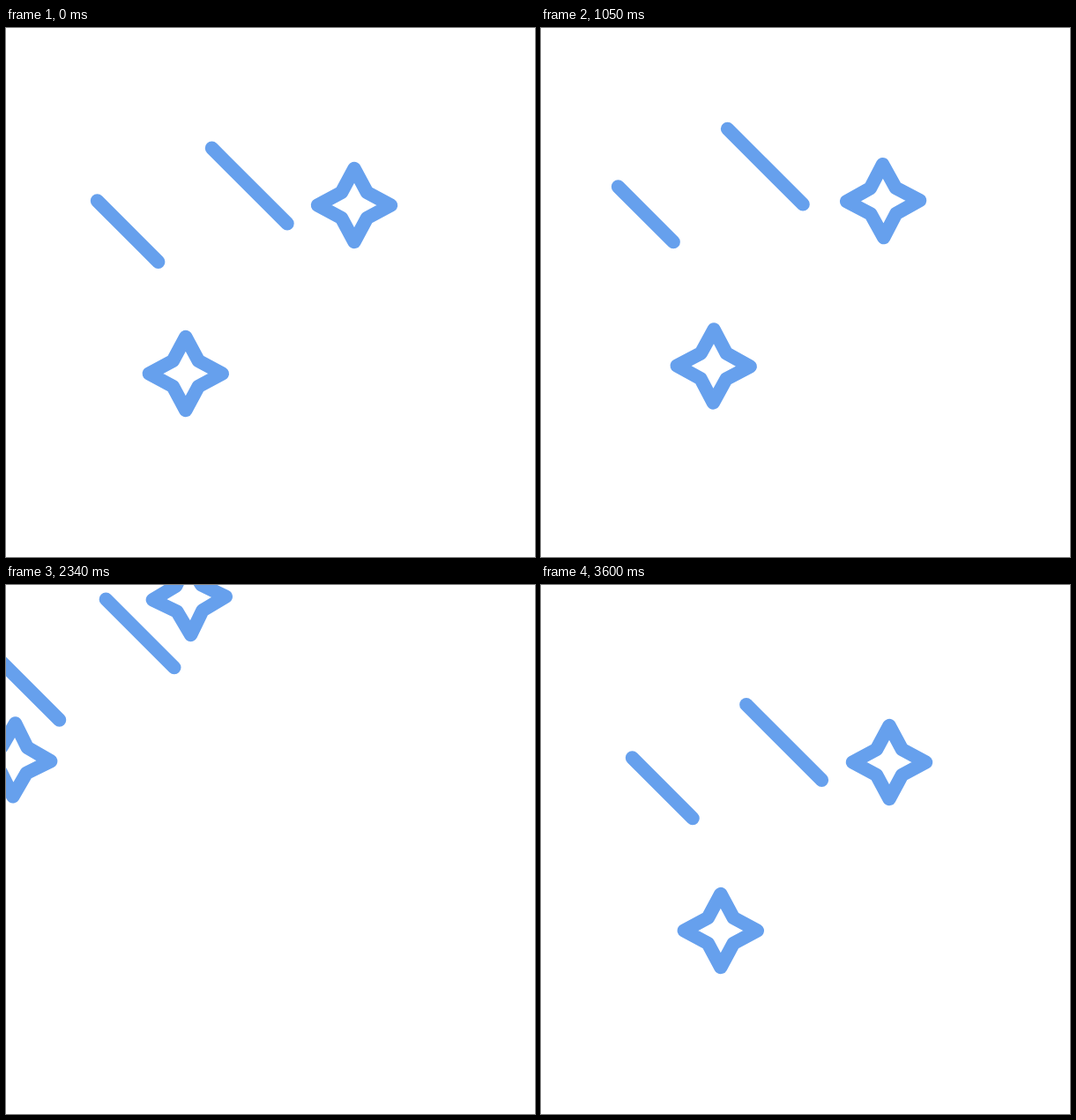
An HTML page without scripts that plays this animation: 600x600 px, repeating every 3630 ms.

```html
<!DOCTYPE html>
<html lang="en">
<head>
<meta charset="utf-8">
<title>Flying stars</title>
<style>
/* --along: travel down the diagonal, --drift: sideways sway */
@property --along { syntax: "<length>"; inherits: false; initial-value: 0px; }
@property --drift { syntax: "<length>"; inherits: false; initial-value: 0px; }
@property --tilt { syntax: "<angle>"; inherits: false; initial-value: 0deg; }

html, body { margin: 0; width: 100%; height: 100%; overflow: hidden; background: #fff; }
svg { display: block; width: 100vw; height: 100vh; }

.star, .streak {
  fill: none;
  stroke: #66a0ed;
  stroke-width: 15.4;
  stroke-linecap: round;
  stroke-linejoin: round;
  transform: translate(calc(var(--along) - var(--drift)), calc(var(--along) + var(--drift))) rotate(calc(var(--tilt) * var(--lean, 0)));
  animation: 3630ms linear infinite;
}
.streak { stroke-dasharray: 121 191.5; }
.right.star { --lean: 1; animation-name: fly-right-star, sway; }
.left.star { --lean: -.75; animation-name: fly-left-star, sway; }
.left.streak { animation-name: fly-left-streak, flow-left, stretch; }
.right.streak { animation-name: fly-right-streak, flow-right, stretch; }

@keyframes fly-right-star {
  0%, 99.17%, 100% { --along: 0px; --drift: 0px; }
  19.01% { --along: -3px; --drift: 1px; }
  38.02% { --along: -8.5px; --drift: 1px; }
  42.15% { --along: 2px; }
  44.63% { --along: 35.5px; }
  47.11% { --along: 114px; --drift: 2px; }
  48.76% { --along: 200px; }
  52.07%, 57.85% { --along: 500px; }
  57.86% { --along: -310px; }
  61.16% { --along: -240px; }
  64.46% { --along: -187px; --drift: .6px; }
  68.87% { --along: -128px; }
  73.55% { --along: -78px; --drift: .3px; }
  75.21% { --along: -67px; }
  82.64% { --along: -28px; }
  90.08% { --along: -5.5px; }
}
@keyframes fly-left-star {
  0%, 99.17%, 100% { --along: 0px; --drift: 0px; }
  19.01% { --along: -7px; --drift: -1px; }
  38.02% { --along: -9.5px; --drift: .5px; }
  42.15% { --along: -4px; }
  44.63% { --along: 15.5px; }
  47.11% { --along: 74px; --drift: 1.7px; }
  48.76% { --along: 150px; }
  52.07%, 57.85% { --along: 500px; }
  57.86% { --along: -320px; }
  61.16% { --along: -248px; }
  64.46% { --along: -194.5px; --drift: .5px; }
  68.87% { --along: -135px; }
  73.55% { --along: -84px; --drift: .3px; }
  75.21% { --along: -73.5px; }
  82.64% { --along: -34px; }
  90.08% { --along: -11px; }
}
@keyframes fly-left-streak {
  0%, 99.17%, 100% { --along: 0px; }
  10.47% { --along: -3.5px; }
  19.01% { --along: -10px; }
  29.75% { --along: -16.5px; }
  38.02% { --along: -19px; }
  42.15% { --along: -12px; }
  45.45% { --along: 22px; }
  47.11% { --along: 48px; }
  48.76% { --along: 110px; }
  50.41% { --along: 230px; }
  52.07%, 57.85% { --along: 500px; }
  57.86% { --along: -350px; }
  61.16% { --along: -245px; }
  64.46% { --along: -197px; }
  73.55% { --along: -100px; }
  77.69% { --along: -65.5px; }
  82.64% { --along: -32px; }
  90.08% { --along: -3.5px; }
}
@keyframes fly-right-streak {
  0%, 99.17%, 100% { --along: 0px; }
  14.88% { --along: -26.5px; }
  29.75% { --along: -36.5px; }
  38.02% { --along: -40px; }
  42.15% { --along: -36px; }
  45.45% { --along: -19px; }
  47.11% { --along: -12px; }
  48.76% { --along: 30px; }
  50.41% { --along: 140px; }
  52.07%, 57.85% { --along: 500px; }
  57.86% { --along: -350px; }
  61.16% { --along: -250px; }
  64.46% { --along: -205px; }
  73.55% { --along: -110px; }
  76.86% { --along: -81px; }
  82.64% { --along: -32px; }
  90.08% { --along: -1px; }
}
@keyframes sway {
  0%, 99.17%, 100% { --tilt: 0deg; }
  19.01% { --tilt: 1.4deg; }
  38.02% { --tilt: -2.7deg; }
  47.11% { --tilt: -2deg; }
  64.46% { --tilt: -2.5deg; }
  73.55% { --tilt: -2deg; }
}
/* the streaks reach further forward during the dash off stage */
@keyframes stretch {
  0%, 41.32%, 57.86%, 100% { d: path("M0 0L163 163"); }
  47.11%, 57.85% { d: path("M0 0L400 400"); }
}
@keyframes flow-left {
  0% { stroke-dashoffset: 24; }
  19.01% { stroke-dashoffset: -584; }
  38.02% { stroke-dashoffset: -1198; }
  47.11% { stroke-dashoffset: -1488.5; }
  52.07%, 57.85% { stroke-dashoffset: -1647; }
  57.86%, 61.16% { stroke-dashoffset: 3.5; }
  64.46% { stroke-dashoffset: -95.5; }
  73.55% { stroke-dashoffset: -367; }
  99.17%, 100% { stroke-dashoffset: -1226; }
}
@keyframes flow-right {
  0% { stroke-dashoffset: -.5; }
  19.01% { stroke-dashoffset: -636.5; }
  38.02% { stroke-dashoffset: -1252.5; }
  47.11% { stroke-dashoffset: -1519.5; }
  52.07%, 57.85% { stroke-dashoffset: -1678; }
  57.86%, 61.16% { stroke-dashoffset: -21; }
  64.46% { stroke-dashoffset: -120; }
  73.55% { stroke-dashoffset: -399.5; }
  99.17%, 100% { stroke-dashoffset: -1250.5; }
}
</style>
</head>
<body>
<svg viewBox="0 0 600 600">
  <defs>
    <path id="star" d="M0-41.5 14.5-14.5 41.5 0 14.5 14.5 0 41.5-14.5 14.5-41.5 0-14.5-14.5Z"/>
  </defs>
  <g transform="translate(103.5 196)"><path class="left streak" d="M0 0L163 163"/></g>
  <g transform="translate(232.5 135.3)"><path class="right streak" d="M0 0L163 163"/></g>
  <g transform="translate(395 201)"><use class="right star" href="#star"/></g>
  <g transform="translate(203.8 392)"><use class="left star" href="#star"/></g>
</svg>
</body>
</html>
```
